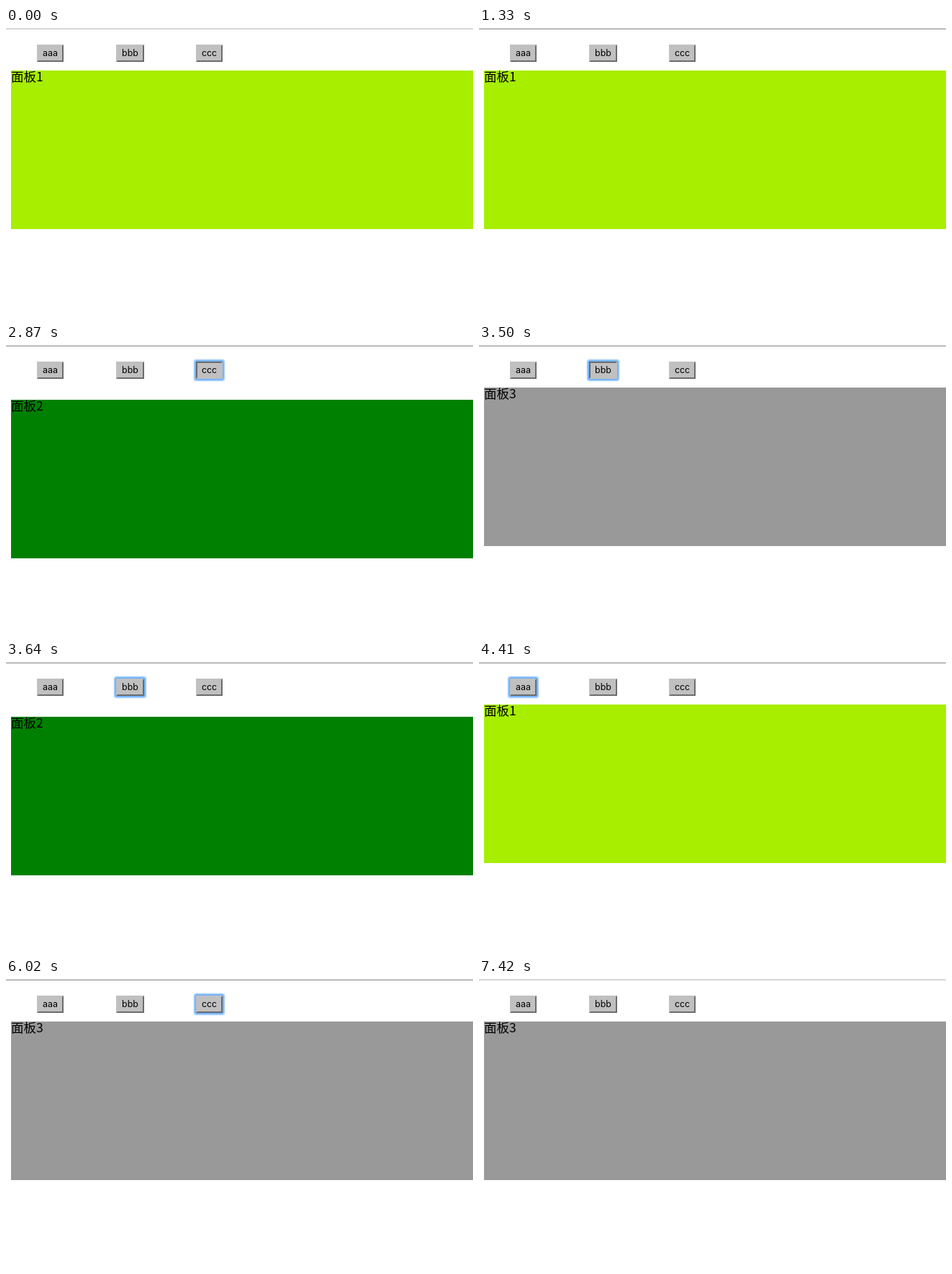
An HTML page with a canvas for the animation above (7490 ms loop, 649 by 401 pixels).

```html
<!DOCTYPE html>
<html lang="zh">
<head>
<meta charset="utf-8">
<title>Tabs</title>
<style>
  html, body { margin: 0; width: 100%; height: 100%; overflow: hidden; background: #fff; }
  canvas { display: block; }
</style>
</head>
<body>
<canvas id="stage" width="649" height="401"></canvas>
<script>
const ctx = document.getElementById('stage').getContext('2d');
const LOOP = 7490;
const FACE = '#c0c0c0', SHADE = '#6c6c6c';

const buttons = [
  { label: 'aaa', x: 43, w: 37 },
  { label: 'bbb', x: 153, w: 39 },
  { label: 'ccc', x: 264, w: 37 }
];
const panels = [
  { label: '面板1', y: 59, color: '#a8ee00' },
  { label: '面板2', y: 76, color: '#008000' },
  { label: '面板3', y: 59, color: '#999999' }
];

// Each click: mouse down at the given time, released after HOLD.
const HOLD = 140;
const clicks = [[2030, 1], [2870, 2], [3500, 1], [4270, 0], [5040, 1], [5880, 2]];
const WINDOW_ON = 1330, WINDOW_OFF = 7350, BLUR = 7420;

function stateAt(t) {
  const state = { panel: 0, focus: -1, pressed: -1, active: t >= WINDOW_ON && t < WINDOW_OFF };
  for (const [down, tab] of clicks) {
    if (t < down) break;
    state.focus = tab;
    if (t < down + HOLD) state.pressed = tab;
    else state.panel = tab;
  }
  if (t >= BLUR) state.focus = -1;
  return state;
}

function rect(color, x, y, w, h) {
  ctx.fillStyle = color;
  ctx.fillRect(x, y, w, h);
}

function text(label, x, y, font, align) {
  ctx.font = font;
  ctx.textAlign = align;
  ctx.fillStyle = '#000';
  ctx.fillText(label, x, y);
}

function drawRing(x, y, w, h) {
  const alphas = [0.95, 0.85, 0.55, 0.15, 0.04];
  ctx.lineWidth = 1;
  alphas.forEach((alpha, i) => {
    const d = i + 0.5;
    ctx.strokeStyle = `rgba(104, 174, 252, ${alpha})`;
    ctx.beginPath();
    ctx.roundRect(x - d, y - d, w + 2 * d, h + 2 * d, d);
    ctx.stroke();
  });
}

function drawButton({ label, x, w }, focused, pressed) {
  const y = 23, h = 24, r = x + w, b = y + h;
  if (focused) drawRing(x, y, w, h);
  rect(pressed ? SHADE : FACE, x, y, w, h);
  // Lower right half of the bevel, mitred at the corners.
  ctx.fillStyle = pressed ? FACE : SHADE;
  ctx.beginPath();
  ctx.moveTo(r, y);
  ctx.lineTo(r, b);
  ctx.lineTo(x, b);
  ctx.lineTo(x + 2, b - 2);
  ctx.lineTo(r - 2, y + 2);
  ctx.fill();
  rect(FACE, x + 2, y + 2, w - 4, h - 4);
  text(label, x + w / 2, 39, '12.4px Inter, "Liberation Sans", sans-serif', 'center');
}

function draw(t) {
  const state = stateAt(t);
  rect('#fff', 0, 0, 649, 401);
  rect('#e4e4e4', 0, 0, 649, 1);
  rect(state.active ? '#979797' : '#cdcdcd', 0, 1, 649, 1);

  const panel = panels[state.panel];
  rect(panel.color, 7, panel.y, 642, 220);
  text(panel.label, 7, panel.y + 15, '17.5px "Noto Sans CJK SC", "Noto Sans CJK", sans-serif', 'left');

  buttons.forEach((button, i) => drawButton(button, i === state.focus, i === state.pressed));
}

const start = performance.now();
function tick() {
  draw((performance.now() - start) % LOOP);
  requestAnimationFrame(tick);
}
tick();
</script>
</body>
</html>
```
